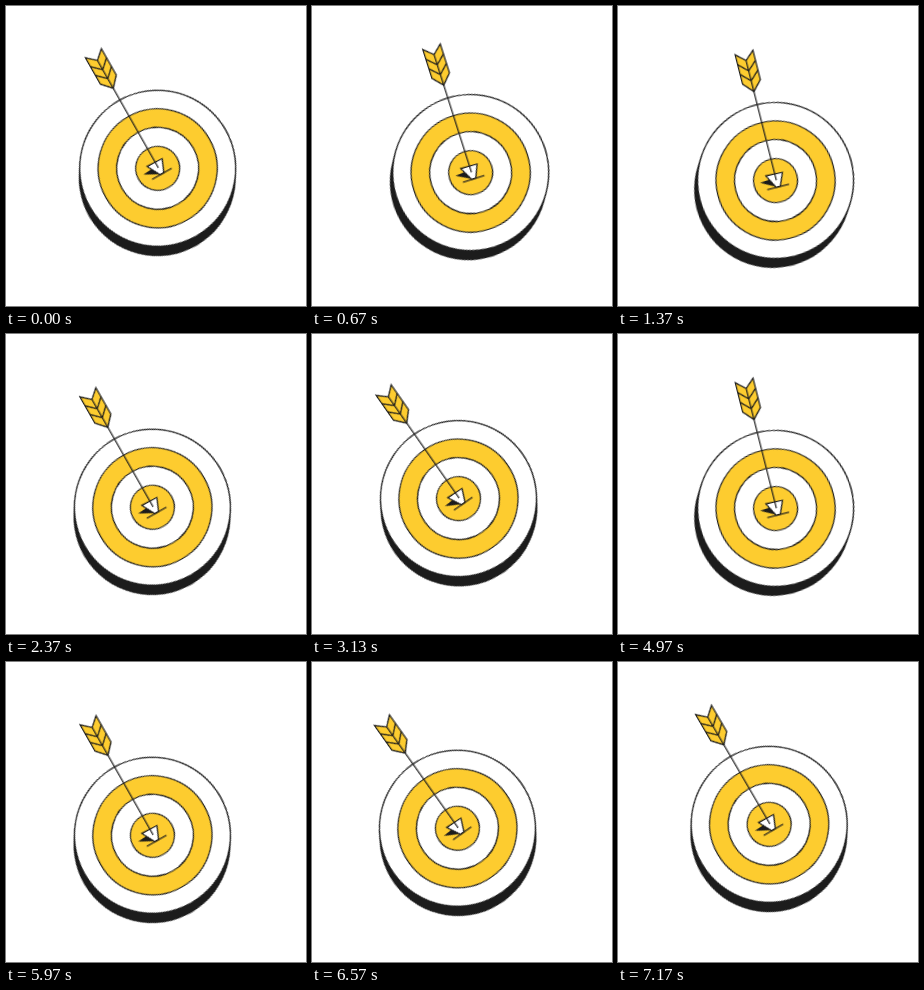
An HTML page for the animation above (7.21 s loop, 300 by 300 pixels).

```html
<!DOCTYPE html>
<html lang="en">
<head>
<meta charset="utf-8">
<title>Floating target</title>
<style>
  html, body { margin: 0; width: 100%; height: 100%; overflow: hidden; background: #fff; }
  svg { display: block; width: 100vw; height: 100vh; }

  /* Three sine swings with shifted phases: sideways, up and down, tilt */
  .sway, .bob, .tilt {
    transform-origin: 0 0;
    animation: 1802.5ms cubic-bezier(.3642, 0, .6358, 1) infinite alternate;
  }
  .sway { animation-name: sway; animation-delay: -860ms; }
  .bob { animation-name: bob; }
  .tilt { animation-name: tilt; animation-delay: -620ms; }

  @keyframes sway { from { transform: translateX(144.9px); } to { transform: translateX(159.5px); } }
  @keyframes bob { from { transform: translateY(162.3px); } to { transform: translateY(176.4px); } }
  @keyframes tilt { from { transform: rotate(-35.3deg); } to { transform: rotate(-13.6deg); } }

  .ink { stroke: #1c1c1c; stroke-width: 1.2; }
  .white { fill: #fff; }
  .gold { fill: #fdcc2f; }
  .line { fill: none; }
  .dark { fill: #1c1c1c; }
  .side { stroke: #1c1c1c; stroke-width: 157; stroke-linecap: round; }
</style>
</head>
<body>
<svg viewBox="0 0 300 300">
  <g class="sway"><g class="bob"><g class="tilt">
    <path class="side" d="M0 0L-5 7.9"/>
    <g class="ink">
      <circle class="white" r="78"/>
      <circle class="gold" r="59.5"/>
      <circle class="white" r="41"/>
      <circle class="gold" r="22"/>

      <!-- Shadow, slit and arrowhead -->
      <path class="dark" stroke="none" d="M-15.5 -1.5L-4.5 -2.5L-1 6.3Z"/>
      <path class="line" d="M-10.3 6.9H12.2"/>
      <path class="white" d="M-8.3 -6.8L8.7 -6.3L3.3 6.6H-1.2Z"/>

      <!-- Shaft and feathers -->
      <path class="line" d="M.8 -91.5V0"/>
      <path class="gold" d="M-8.4 -131.8L.8 -123.5L10 -131.8V-101.5L.8 -91.5L-8.4 -101.5Z"/>
      <path class="line" d="M.8 -123.5V-91.5M-8.4 -121.5L.8 -112.8L10 -121.5M-8.4 -111.5L.8 -102.5L10 -111.5"/>
    </g>
  </g></g></g>
</svg>
</body>
</html>
```
